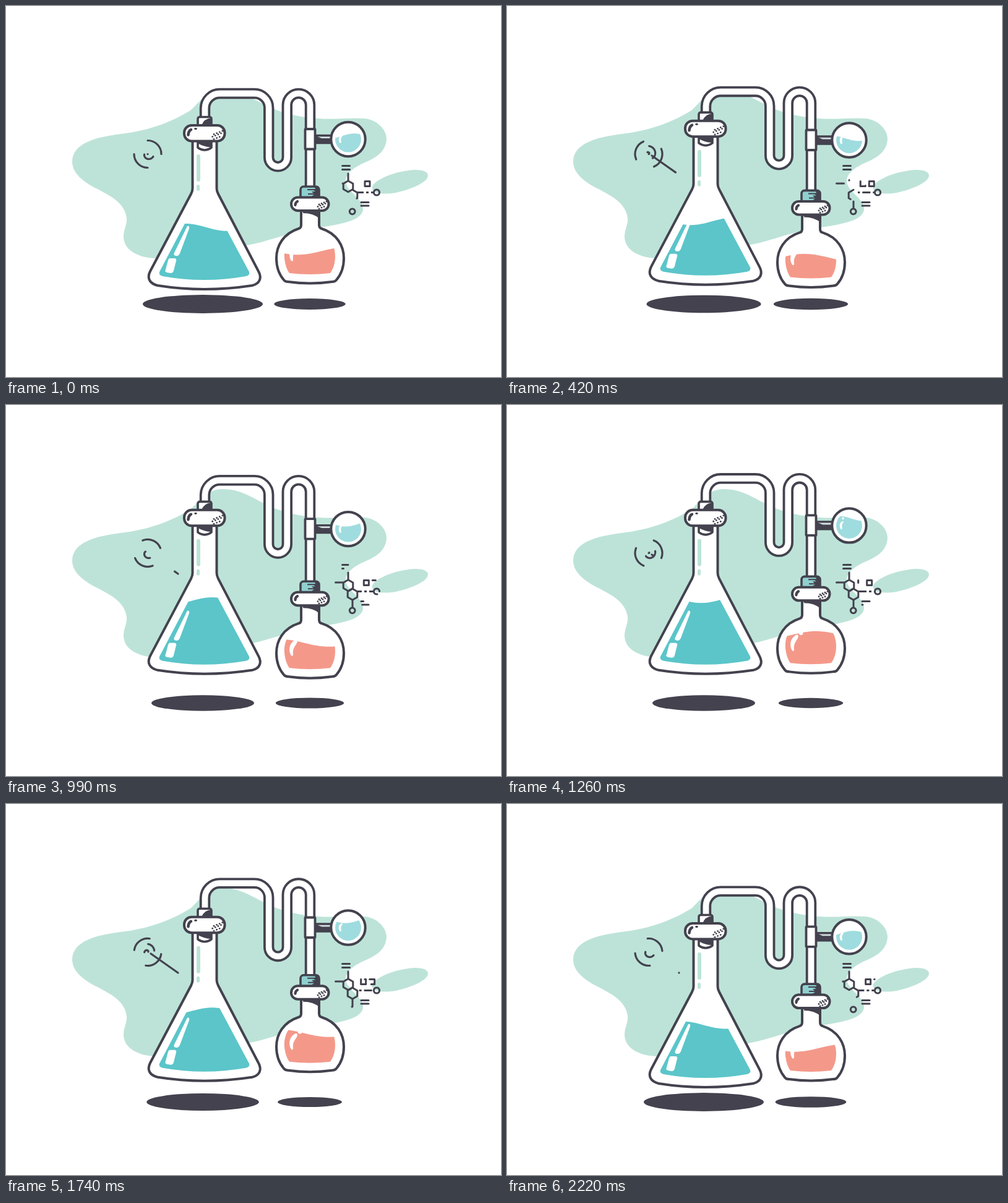
An HTML page with a canvas that plays this animation: 800 px wide and 600 px high, repeating every 2250 ms.

```html
<!DOCTYPE html>
<html lang="en">
<head>
<meta charset="utf-8">
<title>Laboratory</title>
<style>
html, body { margin: 0; width: 100%; height: 100%; overflow: hidden; background: #fff; }
canvas { display: block; }
</style>
</head>
<body>
<canvas id="stage" width="800" height="600"></canvas>
<script>
const ctx = document.getElementById('stage').getContext('2d');
const LOOP = 2250, STEP = 30, HALF = LOOP / 2;
const INK = '#43424e', MINT = '#bde3d8', TEAL = '#5bc5c9', PINK = '#f4998a', SKY = '#9fdcdf';
const rad = deg => deg * Math.PI / 180;
const clamp = v => Math.min(1, Math.max(0, v));
const ease = v => (1 - Math.cos(Math.PI * clamp(v))) / 2;

const blob = new Path2D(`M107 252C107 222 145 212 185 207C235 201 268 187 298 169C315 153 326 136 350 136
  C388 136 405 158 445 171C505 190 545 179 580 182C600 184 615 200 615 215C614 236 597 246 580 253
  C562 261 549 271 549 283C549 299 577 311 577 328C577 346 545 353 500 359C450 368 425 381 385 388
  C335 394 290 408 240 408C208 406 191 392 190 374C190 360 196 354 195 343C192 318 168 307 148 296C125 285 107 270 107 252Z
  M592 296C588 285 620 270 650 266C672 263 682 268 682 274C682 285 656 296 630 302C610 305 595 304 592 296Z`);
const tube = new Path2D(`M321.5 196V165A24 24 0 0 1 345.5 141.5H401.5A23.2 23.2 0 0 1 424.7 164.7V245
  A14.8 14.8 0 0 0 454.3 245V160A18.6 18.6 0 0 1 491.5 160V320`);
const flask = new Path2D(`M301.5 205V295C301.5 299 300 302 299 304L233 429C227 441 233 449 245 452
  Q320 464 398 452C410 449 414 440 408 429L343 304C342 302 340.5 299 340.5 295V205Z`);
const flaskInside = new Path2D('M248 430L302 327H338L393 430Q395 435 388 437Q320 449 253 437Q246 435 248 430Z');
const flaskShine = new Path2D('M293 356Q297 355 296 360L281 400Q279 405 274 404Q270 403 272 399ZM265 408H273Q276 409 275 412L271 428Q270 432 266 432L260 431Q256 430 258 426L262 411Q263 408 265 408Z');
const round = new Path2D(`M477 331V354Q477 359 473 360C448 368 437 388 437 408C437 425 443 436 449 443Q451 446 456 446
  Q491 451 527 446Q532 446 534 443C540 436 546 425 546 408C546 388 535 368 510 360Q506 359 506 354V331Z`);
const roundInside = new Path2D(`M466 370C452 382 449 395 450 408C451 418 454 427 458 432Q491 436 524 432
  C529 425 532 416 532 405C532 393 528 380 516 370Z`);
const roundShine = new Path2D('M469 386C459 390 455 402 461 412Q464 414 464 410C463 402 466 398 470 392Q472 387 469 386ZM475 380a3.5 3.5 0 1 0 .1 0Z');
const bulbInside = new Path2D('M574 215.5a21 21 0 1 1-42 0a21 21 0 1 1 42 0Z');

function paint(path, fill, width = 0) {
  if (fill) { ctx.fillStyle = fill; ctx.fill(path); }
  if (width) { ctx.strokeStyle = INK; ctx.lineWidth = width; ctx.stroke(path); }
}
const shape = (d, fill, width) => paint(new Path2D(d), fill, width);

function box(x, y, w, h, r, fill, width = 3.6) {
  const p = new Path2D();
  p.roundRect(x, y, w, h, r);
  paint(p, fill, width);
}
function ellipse(x, y, rx, ry, fill, width) {
  const p = new Path2D();
  p.ellipse(x, y, rx, ry, 0, 0, 7);
  paint(p, fill, width);
}
function line(points) {
  ctx.beginPath();
  points.forEach(p => ctx.lineTo(...p));
  ctx.stroke();
}
function shifted(dy, draw) {
  ctx.save();
  ctx.translate(0, dy);
  draw();
  ctx.restore();
}

// Strokes only the part of a polyline between fractions a and b
function trim(points, a, b) {
  if (b <= a) return;
  let length = 0;
  for (let i = 1; i < points.length; i++)
    length += Math.hypot(points[i][0] - points[i - 1][0], points[i][1] - points[i - 1][1]);
  if (a > 0 || b < 1) ctx.setLineDash([length * (b - a), length * 2]);
  ctx.lineDashOffset = -a * length;
  line(points);
  ctx.setLineDash([]);
}

// A wave of half a wavelength runs through the surface from x0 to x1
function liquid(vessel, x0, x1, level, height, phase, color) {
  ctx.save();
  ctx.clip(vessel);
  ctx.beginPath();
  for (let u = -0.2; u <= 1.2; u += 0.04)
    ctx.lineTo(x0 + (x1 - x0) * u, level - height * Math.cos(phase - Math.PI * u));
  ctx.lineTo(x1 + 60, 470);
  ctx.lineTo(x0 - 60, 470);
  ctx.fillStyle = color;
  ctx.fill();
  ctx.restore();
}

const ring = (x, y, r, n, start) => Array.from({ length: n + 1 }, (_, i) => {
  const a = rad(start - i * 360 / n);
  return [x + r * Math.cos(a), y + r * Math.sin(a)];
});
const flat = (x, y, w) => [[x, y], [x + w, y]];

// points, erase start, erase time, delay of redraw, redraw time
const molecule = [
  [flat(543.5, 258.5, 12), 480, 280, 290, 280],
  [flat(543.5, 264.5, 12), 650, 300, 300, 250],
  [[[553, 271], [553, 282]], 160, 270, 290, 200],
  [ring(553, 291.7, 9, 6, -90), 130, 270, 300, 300],
  [flat(532.5, 287, 12), 1990, 270, 270, 240],
  [ring(560, 306.2, 9, 6, -90), 1700, 850, 650, 800],
  [ring(599, 301.5, 4.6, 20, 0), 500, 300, 270, 280],
  [[[560, 316], [560, 327]], 1990, 230, 310, 320],
  [ring(559.7, 332.3, 4.4, 20, -90), 1400, 330, 330, 440],
  [flat(574, 317.5, 12), 680, 220, 220, 300],
  [flat(574, 323, 12), 950, 290, 290, 260]
];

function drawMolecule(t) {
  ctx.strokeStyle = INK;
  ctx.lineWidth = 3;
  for (const [points, start, erase, delay, redraw] of molecule) {
    const age = (t - start + LOOP) % LOOP;
    const drawn = clamp((age - delay) / redraw);
    trim(points, 0, drawn);
    if (drawn < 1) trim(points, clamp(age / erase), 1);
  }
  ctx.save();
  ctx.lineCap = 'butt';
  ctx.setLineDash([13, 4, 4, 4]);
  ctx.lineDashOffset = 2 - 50 * t / LOOP;
  line(flat(567, 301.5, 27));
  ctx.restore();
  for (const age of [t % HALF, t % HALF + HALF]) {
    const x = 566 + 14 * age / HALF, y = 283.5;
    trim([[x, y], [x, y + 8], [x + 8, y + 8], [x + 8, y], [x, y]],
      clamp((age - 1500) / 730), clamp((age - 50) / 700));
  }
}

function drawSpiral(t) {
  ctx.strokeStyle = INK;
  ctx.lineWidth = 3.2;
  for (const side of [0, 180]) {
    const a = rad(-45 + side + 360 * t / LOOP);
    ctx.beginPath();
    ctx.arc(229, 239.5, 22, a - Math.PI / 4, a + Math.PI / 4);
    ctx.stroke();
  }
  const age = t % HALF;
  for (const life of [age, age + HALF]) {
    const tail = clamp((life - 500) / 1485), head = clamp((life + 5) / 1500);
    if (tail >= 1) continue;
    line(Array.from({ length: 31 }, (_, i) => {
      const s = tail + (head - tail) * i / 30, a = rad(363 - 450 * s);
      return [229 + 13 * s * Math.cos(a), 239.5 + 13 * s * Math.sin(a)];
    }));
  }
  trim([[234, 242], [278, 273]], ease((age - 620) / 480), ease((age - 50) / 480));
}

function dots(x, y, gap) {
  for (let row = 0; row < 3; row++)
    for (let i = 0; i < 4 - (row === 2); i++)
      ellipse(x + i * gap - row * gap / 2 + (row === 2 ? gap : 0), y - i * gap * 0.4 + row * gap * 0.85, 1.4, 1.4, INK);
}

function drawFlask(wave, level) {
  paint(flask, '#fff', 4);
  box(308, 240, 6, 44, 3, MINT, 0);
  box(308, 289, 5, 10, 2.5, MINT, 0);
  liquid(flaskInside, 289, 358, level, 6, wave, TEAL);
  paint(flaskShine, '#fff');
  shape('M310 218V229Q321 237 332 229V218Z', '#fff', 3.6);
  shape('M310 218H333V228Q322 229 310 222Z', INK);
  box(310, 179.5, 22, 16, 3, '#fff');
  shape('M316 193Q320 182 332 181V193Z', INK);
  box(288, 193, 65.5, 25.5, 12, '#fff', 4);
  shape('M294.5 208.5Q295 202 299 200', null, 4.5);
  ellipse(306.5, 198.5, 2.3, 1.7, INK);
  dots(336, 207.5, 4.6);
}

function drawRound(wave, level) {
  paint(round, '#fff', 4);
  shape('M480 332H507V344Q497 335 480 335Z', INK);
  liquid(roundInside, 452, 530, level, 6, wave, PINK);
  paint(roundShine, '#fff');
  box(476, 292, 30, 20, 5, '#8fd0cf');
  shape('M499 293Q506 292 506 297V309H492L498 305H488V303H497L494 300H500L497 298H487V296H500Z', INK);
  box(461, 309.5, 60.5, 21.5, 10.5, '#fff', 4);
  shape('M467.5 322Q467.5 318 471 316', null, 4.2);
  dots(506, 321, 4);
}

function drawBulb(wave, level) {
  box(500, 209.5, 28, 12, 0, '#d5dfe0', 3.4);
  shape('M501 210L510 214H527V222H501Z', INK);
  box(483.5, 199, 16, 32.5, 1, '#fff', 3.8);
  ellipse(553, 215.5, 27.7, 27.7, '#fff', 4);
  liquid(bulbInside, 533, 573, level, 4, wave, SKY);
  shape('M543 208Q535 212 539 221Q541 223 542 220Q540 214 544 210Z', '#fff');
  ellipse(543, 204, 1.8, 1.8, '#fff');
}

function render(t) {
  const angle = 2 * Math.PI * t / LOOP;
  const swing = lag => Math.cos(angle - rad(lag));
  const sway = (lag, size) => size * (swing(lag) - Math.cos(rad(lag)));
  const main = swing(0), small = swing(62.4), wave = 3 * angle;

  ctx.fillStyle = '#fff';
  ctx.fillRect(0, 0, 800, 600);
  ctx.lineCap = ctx.lineJoin = 'round';
  paint(blob, MINT);
  ellipse(318, 482, 89.75 + 7.25 * main, 13.8 + 1.1 * main, INK);
  ellipse(491, 482, 55.6 + 4.5 * small, 8.6 + 0.6 * small, INK);
  drawSpiral(t);
  drawMolecule(t);

  shifted(sway(20, 11.7), () => {
    ctx.lineCap = 'butt';
    for (const [color, width] of [[INK, 17.4], ['#fff', 9.8]]) {
      ctx.strokeStyle = color;
      ctx.lineWidth = width;
      ctx.stroke(tube);
    }
    ctx.lineCap = 'round';
  });
  shifted(sway(0, 12), () => drawFlask(wave, 348 + 10.7 * swing(22)));
  shifted(sway(62.4, 12), () => drawRound(wave - rad(135), 392.5 + 8 * small));
  shifted(sway(40, 12), () => drawBulb(wave - rad(225), 208 + 4.8 * small));
}

function tick() {
  render(Math.floor(performance.now() % LOOP / STEP) * STEP);
  requestAnimationFrame(tick);
}
tick();
</script>
</body>
</html>
```
